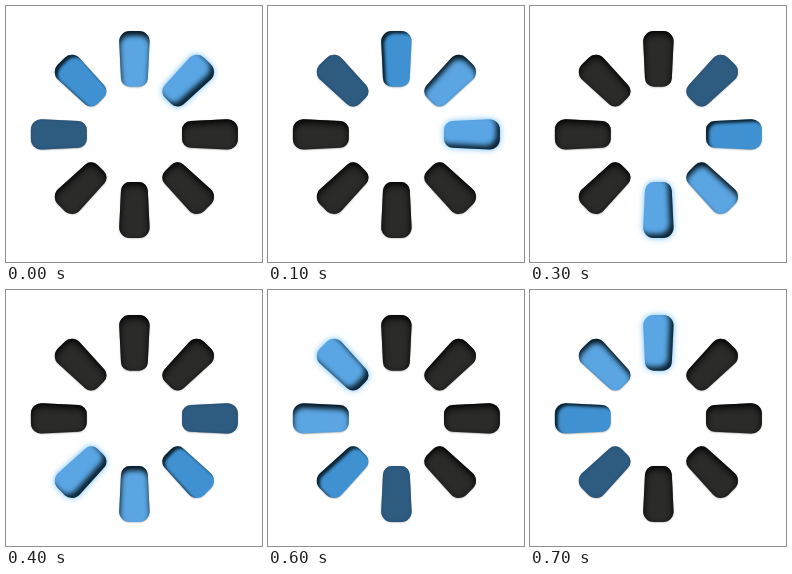
These frames come from a looping animation (256x256 px, 0.8 s). An HTML page with a canvas:

```html
<!DOCTYPE html>
<html lang="en">
<head>
<meta charset="utf-8">
<title>Spinner</title>
<style>
  html, body { margin: 0; width: 100%; height: 100%; overflow: hidden; background: #fff; }
  canvas { display: block; width: 256px; height: 256px; }
</style>
</head>
<body>
<canvas id="stage" width="256" height="256"></canvas>
<script>
const ctx = document.getElementById('stage').getContext('2d');
const COUNT = 8, STEP = 100, CENTER = 128.4, FAR = 1000;

// Looks by steps since a key was lit; inner = [dx, dy, blur, colour]
const LOOKS = [
  { fill: '#5aa6e4', inner: [-4, -4, 5, '#0d2433'], glow: '#6dbaf2' },
  { fill: '#5aa5e2', inner: [0.5, 4.5, 5, '#08161f'] },
  { fill: '#3f91d1', inner: [3, 2.5, 3, '#0c222f'] },
  { fill: '#2e5b80', inner: [0, 0, 3, '#234a6b'] }
];
const IDLE = { fill: '#2b2b2a', inner: [0, 3, 7, '#000'] };

// Tapered key, wider at the outer end
function keyPath() {
  const p = new Path2D(), top = -103.5, bottom = -47.6, wide = 15.7, slim = 13;
  p.moveTo(0, top);
  p.arcTo(wide, top, slim, bottom, 10.5);
  p.arcTo(slim, bottom, -slim, bottom, 9);
  p.arcTo(-slim, bottom, -wide, top, 9);
  p.arcTo(-wide, top, 0, top, 10.5);
  p.closePath();
  return p;
}
const key = keyPath();
const surround = new Path2D(key);
surround.rect(-200, -200, 400, 400);

function shadow(dx, dy, blur, color) {
  ctx.shadowOffsetX = dx;
  ctx.shadowOffsetY = dy;
  ctx.shadowBlur = blur;
  ctx.shadowColor = color;
}

function place(x, y, i) {
  ctx.setTransform(1, 0, 0, 1, x, y);
  ctx.rotate(i * 2 * Math.PI / COUNT);
}

function drawKey(i, look) {
  ctx.save();
  place(CENTER, CENTER, i);
  ctx.fillStyle = look.fill;
  if (look.glow) shadow(0, 0, 6, look.glow);
  else shadow(0, 0.6, 1.5, 'rgba(0,0,0,.3)');
  ctx.fill(key);
  ctx.clip(key);
  // The surround lies off stage, so only its shadow lands on the key
  const [dx, dy, blur, color] = look.inner;
  place(CENTER - FAR, CENTER, i);
  shadow(dx + FAR, dy, blur, color);
  ctx.fill(surround, 'evenodd');
  ctx.restore();
}

function draw(time) {
  const head = Math.floor(time / STEP) + 1;
  ctx.fillStyle = '#fff';
  ctx.fillRect(0, 0, 256, 256);
  for (let i = 0; i < COUNT; i++) {
    const age = ((head - i) % COUNT + COUNT) % COUNT;
    drawKey(i, LOOKS[age] || IDLE);
  }
}

const start = performance.now();
function tick() {
  draw((performance.now() - start) % (COUNT * STEP));
  requestAnimationFrame(tick);
}
tick();
</script>
</body>
</html>
```
